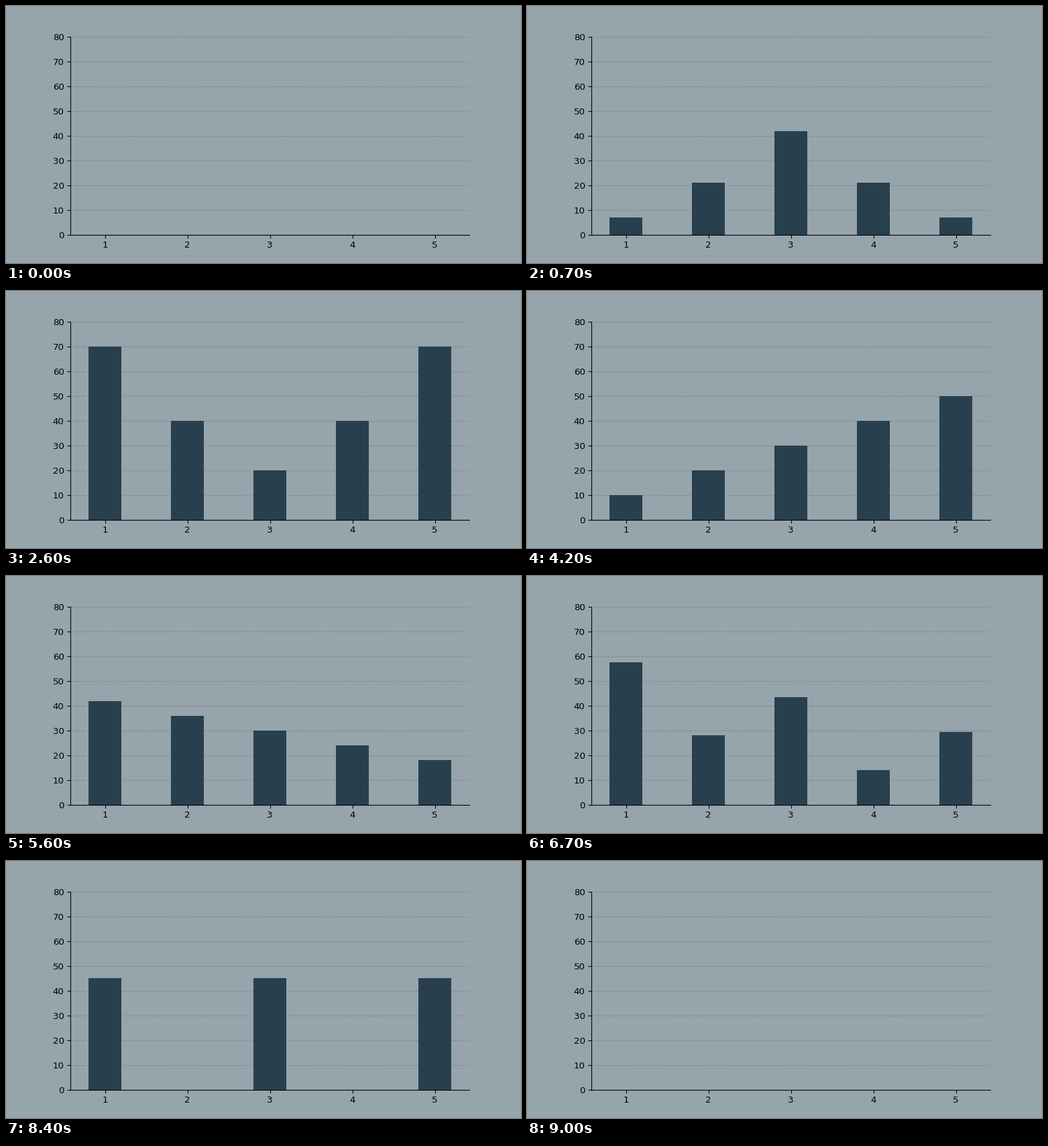
A matplotlib script that plays this animation: 768x384 px, repeating every 9.6 s.

```python
import numpy as np
import matplotlib.pyplot as plt
from matplotlib.animation import FuncAnimation

BACK = "#96a4ac"
BAR = "#28404e"
MOVE, CYCLE = 10, 16  # frames spent moving, frames per pose

x = np.arange(1, 6)
dist = abs(x - 3)

flat = 0 * x
hill = 60 - 35 * dist + 5 * dist**2
valley = 20 + 15 * dist + 5 * dist**2
rising = 10 * x
falling = rising[::-1]
comb = 75 * (x % 2)
poses = [flat, hill, valley, rising, falling, comb, flat]

plt.rcParams["font.family"] = "DejaVu Sans"
fig, ax = plt.subplots(figsize=(8, 4), dpi=96, facecolor=BACK)
ax.set_facecolor(BACK)
fig.subplots_adjust(left=0.125, right=0.9, bottom=0.11, top=0.88)

bars = ax.bar(x, flat, width=0.4, color=BAR)
ax.set_xlim(0.58, 5.42)
ax.set_ylim(0, 80)
ax.set_xticks(x)
ax.set_yticks(range(0, 81, 10))
ax.spines[["top", "right"]].set_visible(False)
ax.set_axisbelow(True)
ax.grid(axis="y", color="gray", linestyle="--", alpha=0.7)


def heights(frame):
    """Move linearly to the next pose, then hold it."""
    pose, step = divmod(max(frame - 1, 0), CYCLE)
    t = min((step + 1) / MOVE, 1) if frame else 0
    return poses[pose] * (1 - t) + poses[pose + 1] * t


def update(frame):
    for bar, height in zip(bars, heights(frame)):
        bar.set_height(height)
    return list(bars)


anim = FuncAnimation(fig, update, frames=CYCLE * (len(poses) - 1),
                     interval=100, repeat=True, repeat_delay=0, blit=False)
plt.show()
```
